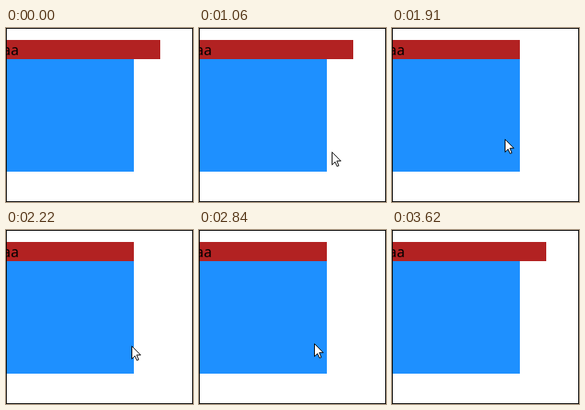
An HTML page that plays this animation: 234x218 px, repeating every 3.85 s.

```html
<!DOCTYPE html>
<html lang="en">
<head>
<meta charset="utf-8">
<title>Header width on hover</title>
<style>
  html, body { margin: 0; width: 100%; height: 100%; overflow: hidden; background: #fff; }
  svg { display: block; }
  text { font: 18px "Noto Sans", sans-serif; text-anchor: end; }
</style>
</head>
<body>
<svg width="234" height="218" viewBox="0 0 234 218">
  <rect y="39" width="160" height="141" fill="#1e90ff"/>
  <rect id="header" y="15" width="193" height="24" fill="#b22222"/>
  <text x="16" y="34">aaaa</text>
  <path id="cursor" visibility="hidden" fill="#fff" stroke="#000" stroke-linejoin="round"
    d="M.5 .5V16.5L4.3 12.8L6.8 18.4L9 17.5L6.6 11.7H11.5Z"/>
  <rect x=".5" y=".5" width="233" height="217" fill="none" stroke="#000"/>
</svg>
<script>
const LOOP = 3850, START = 204, TICK = 77.4, LEAVE = 44;
const header = document.getElementById('header');
const cursor = document.getElementById('cursor');

// Pointer sweeps; ease is a power: above 1 speeds up, below 1 slows down.
const entry = { x: 150, y: 220 };
const sweeps = [
  { tick: 0, steps: 4, x: 118, y: 123, ease: 1 },
  { tick: 6, steps: 3, x: 197, y: 165, ease: 1.8 },
  { tick: 11, steps: 2, x: 135, y: 145, ease: 1 },
  { tick: 14, steps: 3, x: 195, y: 151, ease: 1 },
  { tick: 19, steps: 2, x: 130, y: 137, ease: 1 },
  { tick: 22, steps: 3, x: 180, y: 147, ease: 1.4 },
  { tick: 26, steps: 2, x: 133, y: 142, ease: 1 },
  { tick: 30, steps: 3, x: 180, y: 142, ease: 0.27 },
  { tick: 34, steps: 2, x: 108, y: 142, ease: 1 },
  { tick: 37, steps: 7, x: 198, y: 204, ease: 1.3 }
];

function pointerAt(tick) {
  const i = sweeps.findLastIndex(s => s.tick <= tick);
  const to = sweeps[i], from = sweeps[i - 1] || entry;
  const u = Math.min(1, (tick - to.tick + 1) / to.steps) ** to.ease;
  const mix = (a, b) => Math.round(a + (b - a) * u);
  return { x: mix(from.x, to.x), y: mix(from.y, to.y) };
}

const overBox = ({ x, y }) => x < 160 && y >= 15 && y < 180;

function draw() {
  const tick = Math.floor((performance.now() % LOOP - START) / TICK);
  const visible = tick >= 0 && tick < LEAVE;
  const p = visible ? pointerAt(tick) : entry;
  cursor.setAttribute('visibility', visible ? 'visible' : 'hidden');
  cursor.setAttribute('transform', `translate(${p.x} ${p.y})`);
  header.setAttribute('width', overBox(p) ? 160 : 193);
  requestAnimationFrame(draw);
}
draw();
</script>
</body>
</html>
```
